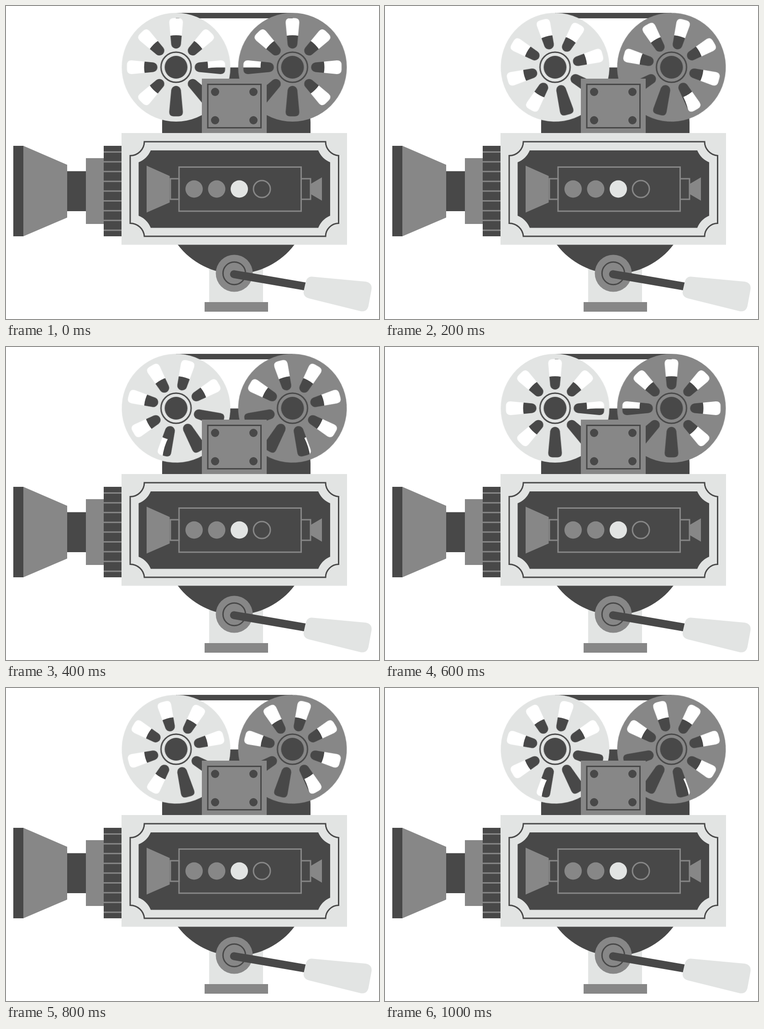
Write an HTML page that moves like this. It is 817 px wide and 685 px high and loops after 1200 ms.

```html
<!DOCTYPE html>
<html lang="en">
<head>
<meta charset="utf-8">
<title>Film camera</title>
<style>
  html, body { margin: 0; width: 100%; height: 100%; overflow: hidden; background: #fff; }
  svg { display: block; width: 100%; height: 100%; }
  .dark { fill: #484848; }
  .grey { fill: #878787; }
  .light { fill: #e2e4e3; }
  .line { fill: none; stroke: #484848; stroke-width: 3; }
  .line-grey { fill: none; stroke: #878787; stroke-width: 3; }
  /* Slots repeat every 45deg, so one eighth of a turn in three ticks loops cleanly */
  .spin { animation: turn .6s steps(3) infinite; }
  .back { animation-direction: normal; --turn: -45deg; }
  .fore { --turn: 45deg; }
  @keyframes turn { to { transform: rotate(var(--turn)); } }
</style>
</head>
<body>
<svg viewBox="0 0 817 685">
  <defs>
    <path id="slot" d="M-10.6-50L-14.9-97Q-15.3-107.5-5-107.5H5Q15.3-107.5 14.9-97L10.6-50A10.7 10.7 0 0 1-10.6-50Z"/>
    <g id="pair"><use href="#slot"/><use href="#slot" transform="rotate(180)"/></g>
    <mask id="slots" maskUnits="userSpaceOnUse" x="-125" y="-125" width="250" height="250">
      <circle r="122" fill="#fff"/>
      <use href="#pair"/>
      <use href="#pair" transform="rotate(45)"/>
      <use href="#pair" transform="rotate(90)"/>
      <use href="#pair" transform="rotate(135)"/>
    </mask>
    <g id="hub">
      <circle class="line" r="33" stroke-width="3.3"/>
      <circle class="dark" r="25"/>
    </g>
  </defs>

  <!-- magazine behind the reels -->
  <g class="dark">
    <rect x="372" y="15" width="256" height="12"/>
    <path d="M342 279V254A119.7 119.7 0 0 1 461.7 134.5H547.3A119.7 119.7 0 0 1 667 254V279Z"/>
    <circle cx="372.5" cy="134" r="70"/>
    <circle cx="627.5" cy="134" r="70"/>
  </g>

  <!-- reels -->
  <g transform="translate(372.5 134)">
    <g class="spin back"><circle class="light" r="119" mask="url(#slots)"/></g>
    <use href="#hub"/>
  </g>
  <g transform="translate(627.5 134)">
    <g class="spin fore"><circle class="grey" r="119" mask="url(#slots)"/></g>
    <use href="#hub"/>
  </g>

  <!-- bolted plate -->
  <rect class="grey" x="429" y="159" width="142" height="120"/>
  <rect class="line" x="442" y="171.5" width="116.5" height="95"/>
  <g class="dark">
    <circle cx="458" cy="188" r="9"/>
    <circle cx="542" cy="188" r="9"/>
    <circle cx="458" cy="250" r="9"/>
    <circle cx="542" cy="250" r="9"/>
  </g>

  <!-- lens -->
  <rect class="dark" x="16" y="306" width="22" height="198"/>
  <path class="grey" d="M38 306L134 347.5V463L38 504Z"/>
  <rect class="dark" x="134" y="361.5" width="41" height="87.5"/>
  <rect class="grey" x="175" y="333" width="39" height="144"/>
  <rect class="dark" x="214" y="306" width="39" height="198"/>
  <path class="line-grey" d="M214 319.5h39m-39 21.4h39m-39 21.4h39m-39 21.4h39m-39 21.4h39m-39 21.4h39m-39 21.4h39m-39 21.4h39m-39 21.4h39"/>

  <!-- stand -->
  <rect class="light" x="445" y="560" width="118" height="88"/>
  <rect class="grey" x="435" y="648" width="139" height="21"/>
  <path class="dark" d="M376 522A160 160 0 0 0 632 522Z"/>

  <!-- body -->
  <rect class="light" x="253" y="278" width="494" height="244.5"/>
  <path class="line" d="M303 297H700A31 31 0 0 0 728.5 327.500V475.500A29 29 0 0 0 700 504H303A31 31 0 0 0 272 475.500V327.500A31 31 0 0 0 303 297Z"/>
  <path class="dark" d="M317 316H684A48.500 48.500 0 0 0 710 342V459A48.500 48.500 0 0 0 684 485.500H317A48.500 48.500 0 0 0 290.500 459V342A48.500 48.500 0 0 0 317 316Z"/>

  <!-- panel -->
  <path class="grey" d="M308 349.500L358.500 372V430L308 452ZM668 389L692 375V426L668 412Z"/>
  <g class="line-grey">
    <rect x="360" y="378" width="19" height="45"/>
    <rect x="379" y="352.500" width="267.500" height="96.500"/>
    <rect x="646.500" y="378" width="20.500" height="45"/>
    <circle cx="560.500" cy="400.500" r="18.500"/>
  </g>
  <circle class="grey" cx="412" cy="400.500" r="19"/>
  <circle class="grey" cx="461.500" cy="400.500" r="19"/>
  <circle class="light" cx="511" cy="400.500" r="19"/>

  <!-- crank -->
  <circle class="grey" cx="500" cy="585" r="40.500"/>
  <circle class="line" cx="500" cy="585" r="24.700"/>
  <path d="M499.500 587L662 614.800" fill="none" stroke="#484848" stroke-width="17.500" stroke-linecap="round"/>
  <path class="light" d="M672 592.500L786 603Q803 605 800.500 621L794 656Q791 670 777 668L664 640Q650 636 652 624L656 606Q659 591 672 592.500Z"/>
</svg>
</body>
</html>
```
